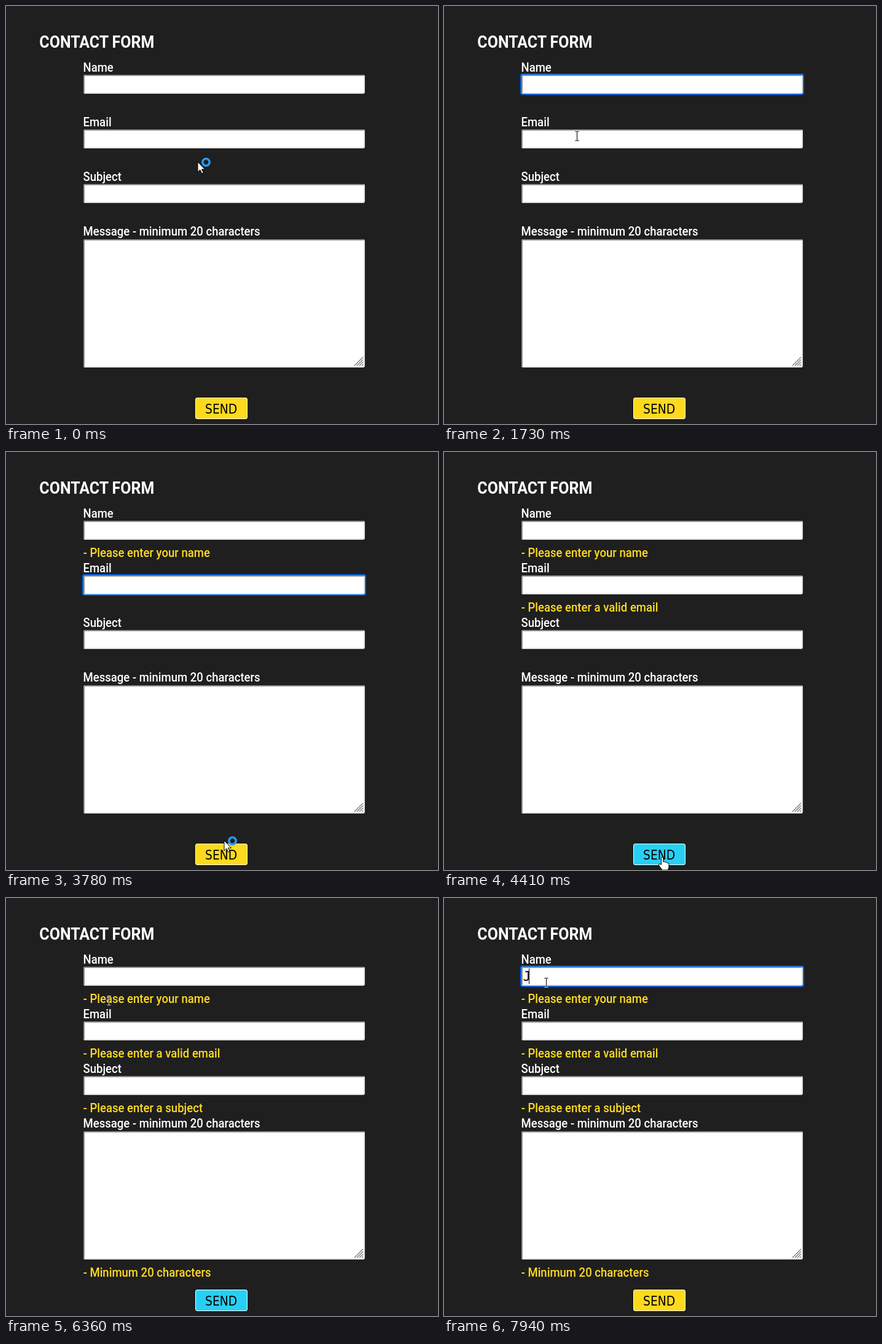
These frames come from a looping animation (703x681 px, 8000 ms). An HTML page:

```html
<!DOCTYPE html>
<html lang="en">
<head>
<meta charset="utf-8">
<title>Contact form</title>
<style>
html, body { margin: 0; width: 100%; height: 100%; overflow: hidden; background: #1f1f1f; }
svg { display: block; width: 703px; height: 681px; }
text { font: 450 20.8px Roboto, sans-serif; font-stretch: 75%; font-variation-settings: "wdth" 75; fill: #fff; white-space: pre; }
text.title { font-size: 28px; font-weight: 600; }
text.error { fill: #ffdb20; }
text.send { font-family: "DejaVu Sans", sans-serif; font-weight: 400; fill: #000; }
text.typed { font-family: "DejaVu Sans Mono", monospace; font-weight: 400; fill: #000; }
text.wide { font-stretch: 100%; font-variation-settings: "wdth" 100; }
#beam { mix-blend-mode: difference; }
</style>
</head>
<body>
<svg id="stage" viewBox="0 0 703 681"></svg>
<script>
const LOOP = 8000, STEP = 80;
const stage = document.getElementById('stage');

function add(tag, attrs, content) {
  const el = document.createElementNS('http://www.w3.org/2000/svg', tag);
  for (const key in attrs) el.setAttribute(key, attrs[key]);
  if (content) el.textContent = content;
  return stage.appendChild(el);
}

function show(el, on) {
  el.setAttribute('visibility', on ? 'visible' : 'hidden');
}

function place(el, x, y) {
  el.setAttribute('transform', `translate(${x} ${y})`);
}

// Falls back to a general condensing factor when no condensed face exists.
function write(content, x, y, cls, ratio = 0.892) {
  const el = add('text', { class: cls + ' wide' }, content);
  const wide = el.getComputedTextLength();
  el.setAttribute('class', cls);
  const narrow = el.getComputedTextLength();
  const k = narrow > wide * 0.97 ? ratio : 1;
  el.setAttribute('transform', `translate(${x} ${y}) scale(${k} 1)`);
  return { el, x, y, width: narrow * k };
}

add('rect', { width: 703, height: 681, fill: '#1f1f1f' });
write('CONTACT FORM', 54.3, 68, 'title');

const fields = [
  { label: 'Name', error: 'Please enter your name', since: 1950 },
  { label: 'Email', error: 'Please enter a valid email', since: 4410 },
  { label: 'Subject', error: 'Please enter a subject', since: 4650 },
  { label: 'Message - minimum 20 characters', error: 'Minimum 20 characters', since: 4650, tall: true }
];

fields.forEach((f, i) => {
  const row = 89 * i;
  f.top = 112 + row + (f.tall ? 1 : 0);
  f.bottom = f.top + (f.tall ? 209 : 31);
  const height = f.bottom - f.top;
  f.caption = write(f.label, 125.5, 107 + row, 'label');
  f.ring = add('rect', { x: 124, y: f.top - 2, width: 462, height: height + 4, rx: 4, fill: '#0060df' });
  add('rect', { x: 127, y: f.top + 1, width: 456, height: height - 2, rx: 2, fill: '#fff', stroke: '#e0e0e0', 'stroke-width': 2 });
  add('path', { d: `M127 ${f.bottom - 2}V${f.top + 3}q0 -2 2 -2H582`, fill: 'none', stroke: '#8f8f8f', 'stroke-width': 2 });
  f.note = write('- ' + f.error, 125.7, f.bottom + 28, 'error');
});

for (let n = 14; n > 0; n -= 4) {
  add('path', { d: `M${581 - n} 586l${n} ${-n}`, stroke: '#777', 'stroke-width': 1.2 });
}
const button = add('rect', { x: 308.5, y: 638.5, width: 84, height: 34, rx: 2.5, stroke: '#fff' });
write('SEND', 324, 664, 'send', 0.885);
const typed = add('text', { class: 'typed' }, 'J');
place(typed, 128.6, 135);
const caret = add('rect', { width: 1, height: 25 });

const outline = { fill: '#fff', stroke: '#000', 'stroke-linejoin': 'round' };
const arrow = add('path', { d: 'M0 0V16.5l3.8 -3.6 2.8 6 2.6 -1.2 -2.8 -5.7h5.2z', ...outline });
const busy = add('circle', { r: 5.7, fill: 'none', stroke: '#2a97f2', 'stroke-width': 3.6 });
const hand = add('path', {
  d: 'M-1.5 12V1.6a1.6 1.6 0 0 1 3.2 0V7.5q3 -.8 3.4 1q3 -.6 3.3 1q2.6 -.3 2.6 2V16q0 2 -1.5 4V21H-.5V20q-3.5 -4 -5.3 -7.5q.5 -2.5 2.5 -1z',
  ...outline
});
const beam = add('path', { id: 'beam', d: 'M-3 -7.5h2.5l.5 .5l.5 -.5h2.5M0 -7V7M-3 7.5h2.5l.5 -.5l.5 .5h2.5', fill: 'none', stroke: '#fff' });

// Each move is a quadratic curve that starts where the last one ended.
const home = [312, 254];
const moves = [
  { from: 70, to: 310, bend: [225, 200], end: [212, 132] },
  { from: 1160, to: 1730, bend: [214, 172], end: [216, 212] },
  { from: 2260, to: 2980, bend: [478, 123], end: [389, 441] },
  { from: 3070, to: 4090, bend: [348, 645], end: [355, 660] },
  { from: 5180, to: 5510, bend: [364, 406], end: [335, 458] },
  { from: 5750, to: 6680, bend: [127, 123], end: [166, 138] }
];

function pointerAt(t) {
  let pos = home;
  for (const { from, to, bend, end } of moves) {
    if (t < from) break;
    const count = Math.round((to - from) / STEP);
    const u = Math.min(1, Math.floor((t - from) / (to - from) * count + 0.2) / count);
    const v = 1 - u;
    pos = pos.map((p, i) => Math.round(v * v * p + 2 * u * v * bend[i] + u * u * end[i]));
    if (u < 1) break;
  }
  return pos;
}

function inside(x, y, left, top, right, bottom) {
  return x > left && x < right && y > top && y < bottom;
}

function overText(text, x, y) {
  return inside(x, y, text.x, text.y - 18, text.x + text.width, text.y + 6);
}

function drawPointer(t) {
  const [x, y] = pointerAt(t);
  const onButton = inside(x, y, 308, 638, 393, 673);
  const onText = fields.some(f => inside(x, y, 126, f.top, 584, f.bottom) ||
    overText(f.caption, x, y) || (t >= f.since && overText(f.note, x, y)));
  const plain = !onButton && !onText;
  show(hand, onButton);
  show(beam, onText);
  show(arrow, plain);
  show(busy, plain);
  place(hand, x, y);
  place(arrow, x, y);
  place(beam, x + 0.5, y);
  place(busy, x + 13.5, y + 0.5);
}

// Periods in which a field has the focus.
const focuses = [
  { field: 0, from: 940, to: 1950 },
  { field: 1, from: 1950, to: 4410 },
  { field: 0, from: 6840, to: LOOP }
];

function draw(t) {
  const focus = focuses.find(p => t >= p.from && t < p.to);
  fields.forEach((f, i) => {
    show(f.ring, focus && focus.field === i);
    show(f.note.el, t >= f.since);
  });
  button.setAttribute('fill', t >= 4410 && t < 6840 ? '#28cff5' : '#ffd91c');

  const hasText = t >= 7940;
  show(typed, hasText);
  show(caret, focus && (t - focus.from) % 1000 < 520);
  if (focus) {
    caret.setAttribute('x', hasText ? 138 : 130);
    caret.setAttribute('y', fields[focus.field].top + 3);
  }
  drawPointer(t);
}

const begin = performance.now();
function tick() {
  draw((performance.now() - begin) % LOOP);
  requestAnimationFrame(tick);
}
tick();
</script>
</body>
</html>
```
